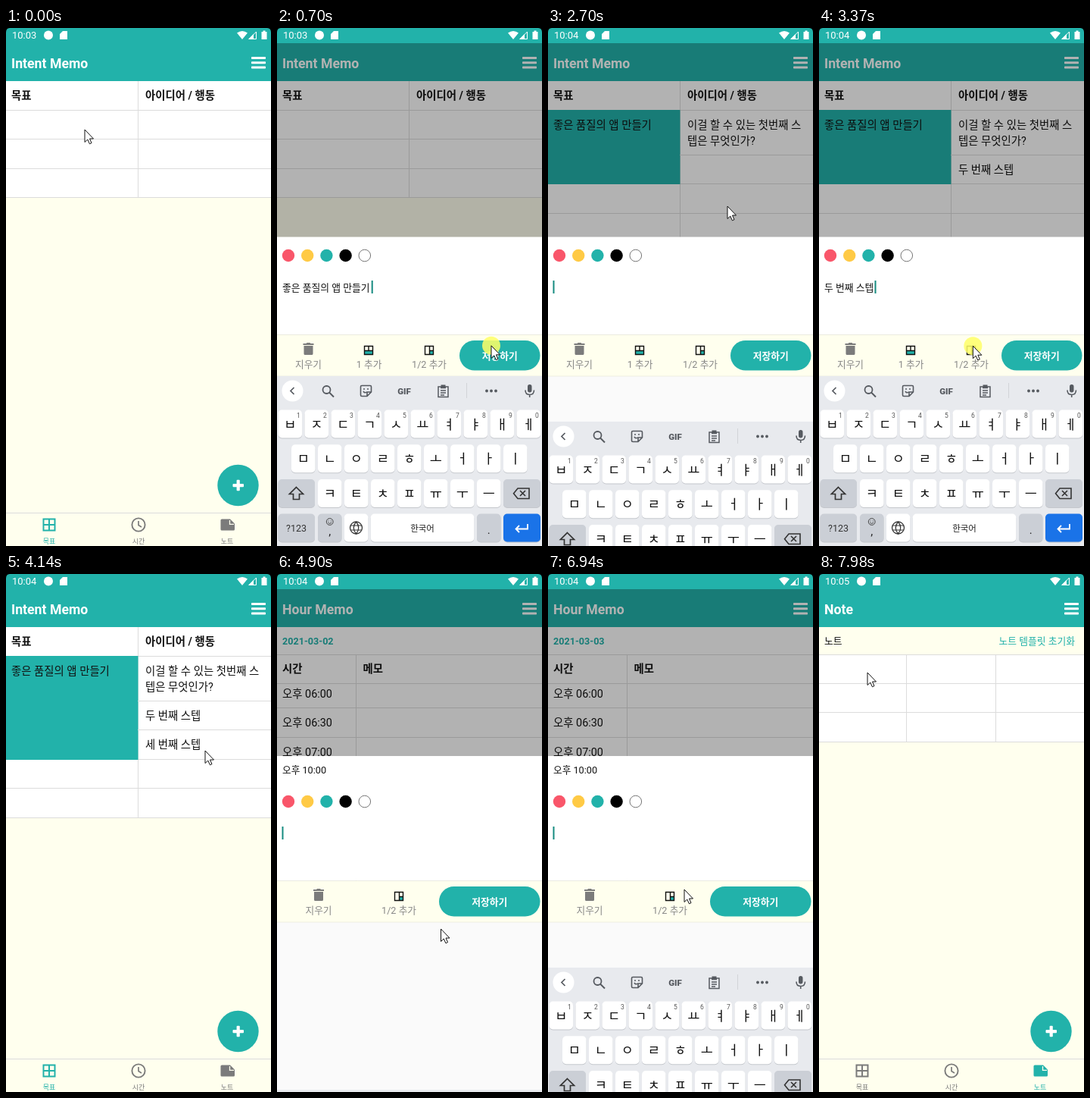
These frames come from a looping animation (350x683 px, 8000 ms). An HTML page:

```html
<!DOCTYPE html>
<html lang="ko">
<head>
<meta charset="utf-8">
<title>Planner demo</title>
<style>
html, body { margin: 0; width: 100%; height: 100%; overflow: hidden; background: #ffffee; }
svg { display: block; width: 100vw; height: 100vh; }
text { font-family: Roboto, "Noto Sans CJK KR", "Noto Sans CJK", "Noto Sans", sans-serif; white-space: pre; }
</style>
</head>
<body>
<svg viewBox="0 0 350 683" preserveAspectRatio="none">
  <g id="view"></g>
  <g id="keyboard"></g>
  <path d="M0 0H5Q0 0 0 6ZM350 0H345Q350 0 350 6Z"/>
  <circle id="glow" r="12" fill="#ffff66" opacity=".85"/>
  <path id="cursor" d="M0 0V16.5L3.8 13L6.4 18.8L9 17.6L6.5 12H11.5Z" fill="#fff" stroke="#111" stroke-width="1"/>
</svg>
<script>
const LOOP = 8000, TEAL = '#22b2aa', CREAM = '#ffffee', GRAY = '#7b7b7b', LINE = '#dcdcdc';
const ROW = 38.4;
const GOAL = '좋은 품질의 앱 만들기';
const FIRST = '이걸 할 수 있는 첫번째 스|텝은 무엇인가?';
const SECOND = '두 번째 스텝', THIRD = '세 번째 스텝', MEMO = 'Gif 만들기';
const FULL = [0, 1];
const $ = id => document.getElementById(id);
const clamp = v => Math.max(0, Math.min(1, v));
const ease = v => v * v * (3 - 2 * v);

// Each entry merges its changes into the state from that time on.
const open = (text = '', type = FULL, fill = '#fff') => ({ edit: true, text, type, draft: fill });
const close = changes => ({ edit: false, ...changes });
const events = [
  [0, { screen: 'goal', goal: '', fill: '', steps: [''], date: '2021-03-02', memo: '', edit: false }],
  [330, open(GOAL, [450, 700])],
  [780, close({ goal: GOAL })],
  [880, open(FIRST, [960, 1160])],
  [1240, close({ steps: [FIRST] })],
  [1320, open(GOAL)],
  [1480, { draft: '#000' }],
  [1690, { draft: TEAL }],
  [1770, close({ fill: TEAL })],
  [1900, open(FIRST)],
  [2180, close({ steps: [FIRST, ''] })],
  [2620, open(SECOND, [2780, 2960])],
  [3060, close({ steps: [FIRST, SECOND] })],
  [3200, open(SECOND)],
  [3400, close({ steps: [FIRST, SECOND, ''] })],
  [3540, open(THIRD, [3700, 3880])],
  [3960, close({ steps: [FIRST, SECOND, THIRD] })],
  [4400, { screen: 'time' }],
  [4600, {}],
  [4900, open(MEMO, [5060, 5280])],
  [5400, close({ memo: MEMO })],
  [5760, open(MEMO)],
  [6060, close()],
  [6420, { date: '2021-03-03', memo: '' }],
  [6860, open()],
  [7220, close()],
  [7500, { screen: 'note' }]
];
const path = [
  [0, 104, 134], [330, 104, 134], [750, 290, 430], [790, 290, 430], [860, 240, 130], [960, 240, 130],
  [1210, 290, 432], [1310, 80, 135], [1450, 91, 300], [1560, 117, 299], [1620, 117, 299],
  [1670, 66, 300], [1750, 290, 432], [1880, 240, 140], [1960, 240, 140], [2130, 200, 430], [2220, 200, 430],
  [2530, 237, 192], [2620, 237, 192], [2690, 237, 235], [2780, 237, 235], [3030, 290, 432], [3180, 237, 190],
  [3350, 200, 430], [3500, 263, 228], [3700, 263, 233], [3930, 290, 432], [4080, 263, 233], [4180, 263, 233],
  [4370, 174, 655], [4540, 65, 619], [4620, 65, 619], [4870, 216.5, 468], [5060, 216.5, 468], [5360, 281, 432],
  [5600, 216.5, 468], [5780, 216.5, 468], [6000, 281, 432], [6090, 281, 432], [6360, 284, 619], [6440, 284, 619],
  [6780, 180, 464], [6860, 180, 460], [6930, 180, 416], [7020, 180, 416], [7180, 281, 432],
  [7450, 292, 655], [7560, 292, 655], [7950, 64, 130], [LOOP, 64, 130]
];

const rect = (x, y, w, h, fill, more = '') => `<rect x="${x}" y="${y}" width="${w}" height="${h}" fill="${fill}" ${more}/>`;
const dot = (x, y, r, fill, more = '') => `<circle cx="${x}" cy="${y}" r="${r}" fill="${fill}" ${more}/>`;
const shape = (d, fill, more = '') => `<path d="${d}" fill="${fill}" ${more}/>`;
const stroke = (d, color, width = 2) => shape(d, 'none', `stroke="${color}" stroke-width="${width}"`);
const hline = (y, x = 0, w = 350) => rect(x, Math.round(y - .5), w, 1, LINE);
const vline = (x, y, h) => rect(x - .5, y, 1, h, LINE);
const label = (s, x, y, size = 14.4, fill = '#111', weight = 400, anchor = 'start') =>
  `<text x="${x}" y="${y}" font-size="${size}" fill="${fill}" font-weight="${weight}" text-anchor="${anchor}">${s}</text>`;
const center = (s, x, y, size, fill, weight = 400) => label(s, x, y, size, fill, weight, 'middle');
const heading = (s, x, y) => label(s, x, y, 14.4, '#111', 700);
const lines = (s, x, y) => s.split('|').map((part, i) => label(part, x, y + 21 * i)).join('');

function topBar(title, t) {
  const clock = t < 1680 ? '10:03' : t < 7720 ? '10:04' : '10:05';
  return rect(0, 0, 350, 70, TEAL) + label(clock, 8, 14.3, 13, '#fff')
    + dot(56, 9.5, 6, '#fff') + shape('M75 4H81V15H71V8Z', '#fff')
    + shape('M305 6.5Q312 1.5 319 6.5L312 15Z', '#fff') + stroke('M321 14.5L330.5 5V14.5Z', '#fff', 1)
    + shape('M320 15L327 8V15Z', '#fff') + shape('M337.5 5H339.5V3.5H342.5V5H344.5V15H337.5Z', '#fff')
    + label(title, 7, 52.5, 17.7, '#fff', 700)
    + [38, 44.3, 50.6].map(y => rect(324, y, 19, 3, '#fff', 'rx=".8"')).join('');
}

function navBar(screen) {
  const tint = name => name === screen ? TEAL : GRAY;
  return rect(0, 639, 350, 44, CREAM) + hline(639)
    + stroke('M49.5 647.5H64.5V662.5H49.5ZM57 647V663M49 655H65', tint('goal'))
    + stroke('M175 650V655.5L179 658', tint('time'), 1.7)
    + dot(175, 655, 8.6, 'none', `stroke="${tint('time')}" stroke-width="1.9"`)
    + shape('M285 647.5H296L302 653.5V661Q302 662.5 300.5 662.5H285Q283.5 662.5 283.5 661V649Q283.5 647.5 285 647.5Z', tint('note'))
    + stroke('M295.5 649V654.3H301', CREAM, 1.3)
    + [['목표', 57, 'goal'], ['시간', 175, 'time'], ['노트', 292, 'note']]
      .map(([s, x, name]) => center(s, x, 680, 9, tint(name))).join('');
}

const addButton = () => dot(306.5, 603, 27.2, TEAL)
  + rect(299.5, 601, 14.5, 4.2, '#fff', 'rx="1"') + rect(304.6, 595.8, 4.2, 14.5, '#fff', 'rx="1"');

function goalScreen(s) {
  let y = 108.3;
  let cells = '';
  s.steps.forEach((step, i) => {
    if (i) cells += hline(y, 174, 176);
    cells += lines(step, 184, y + 24.2);
    y += step.includes('|') ? 59.2 : ROW;
  });
  const bottom = y + 2 * ROW;
  return rect(0, 70, 350, bottom - 70, '#fff')
    + heading('목표', 7, 94) + heading('아이디어 / 행동', 184, 94)
    + [108.3, y, y + ROW, bottom].map(v => hline(v)).join('') + vline(174.5, 70, bottom - 70)
    + (s.fill ? rect(0, 108, 174.5, Math.round(y + .5) - 108, s.fill) : '')
    + label(s.goal, 7, 132.5) + cells + addButton();
}

function timeScreen(s, t) {
  const scroll = 1387.8 * ease(clamp((t - 4600) / 220));
  let rows = '', current = '';
  for (let i = 0; i < 48; i++) {
    const y = 144 + ROW * i - scroll;
    if (y < 100 || y > 599) continue;
    const hour = i >> 1, now = i === 44;
    const time = `${hour < 12 ? '오전' : '오후'} ${String(hour > 12 ? hour - 12 : hour).padStart(2, '0')}:${i % 2 ? '30' : '00'}`;
    rows += hline(y + ROW) + label(time, now ? 8 : 7, y + 24.2);
    if (now) {
      rows += label(s.memo, 114.5, y + 24);
      current = rect(.5, Math.round(y) - .5, 104, 38, 'none', `stroke="${TEAL}" stroke-width="1.2"`);
    }
  }
  return rect(0, 70, 350, 530, '#fff') + vline(104.5, 106, 493) + rows + current
    + rect(0, 70, 350, 74, '#fff') + vline(104.5, 106, 38) + hline(106.3) + hline(144)
    + label(s.date, 7, 93, 12.6, TEAL, 700)
    + heading('시간', 7, 130) + heading('메모', 113.5, 130)
    + rect(0, 599, 350, 40, CREAM)
    + label('현재 시간대로 이동', 15, 624, 12.8, TEAL) + center('달력', 284, 624, 12.8, TEAL)
    + dot(175, 603, 27.2, TEAL) + center('지금', 175, 608, 12.8, '#fff', 700);
}

function noteScreen() {
  return label('노트', 7, 93, 12.8) + label('노트 템플릿 초기화', 338, 93, 12.8, TEAL, 400, 'end')
    + rect(0, 106.3, 350, 115, '#fff') + [0, 1, 2, 3].map(i => hline(106.3 + 38.3 * i)).join('')
    + vline(115.5, 106, 115) + vline(233.5, 106, 115) + addButton();
}

const trash = x => shape(`M${x - 6} 419H${x + 6}V429.5Q${x + 6} 431 ${x + 4.5} 431H${x - 4.5}Q${x - 6} 431 ${x - 6} 429.5ZM${x - 7} 416H${x - 3}L${x - 2} 415H${x + 2}L${x + 3} 416H${x + 7}V418H${x - 7}Z`, GRAY);
const halfIcon = x => rect(x, 425, 6, 6, TEAL) + stroke(`M${x - 5.5} 419.5H${x + 5.5}V430.5H${x - 5.5}ZM${x + .5} 419V431M${x} 425.5H${x + 6}`, '#111', 1.4);
const fullIcon = x => rect(x - 6, 425, 12, 6, TEAL) + stroke(`M${x - 5.5} 419.5H${x + 5.5}V430.5H${x - 5.5}ZM${x} 419V425M${x - 6} 425.5H${x + 6}`, '#111', 1.4);

function editor(s, t) {
  const timed = s.screen === 'time';
  const top = timed ? 240 : 275.5;
  const full = s.text.replace('|', '');
  const typed = full.slice(0, Math.ceil(full.length * clamp((t - s.type[0]) / (s.type[1] - s.type[0]))));
  const caret = 7 + [...typed].reduce((w, c) => w + (c > '\u3130' ? 11.8 : 4), 0);
  const black = s.draft === '#000';
  const [del, half, save] = timed ? [55, 161, 214] : [41.5, 201, 241];
  const swatches = ['#f9566a', '#ffca45', TEAL, '#000'];
  return rect(0, 20, 350, 663, '#000', 'opacity=".3"')
    + rect(0, top, 350, 404 - top, '#fff') + rect(0, 324, 350, 80.5, s.draft)
    + (timed ? label('오후 10:00', 7, 263, 12.7) : '')
    + swatches.map((c, i) => dot(15 + 25.2 * i, 300, 8.2, c)).join('')
    + dot(115.8, 300, 7.8, '#fff', 'stroke="#777" stroke-width="1"')
    + label(typed, 7, 346.5, 12.8, black ? '#0f0' : '#111')
    + (black ? '' : rect(caret - .5, 333, 2, 17, s.draft === TEAL ? '#111' : '#168b80'))
    + rect(0, 404.5, 350, 55, CREAM) + rect(0, 459, 350, 224, '#fafafa') + rect(0, 458.5, 350, 1, '#f0f0e4')
    + trash(del) + center('지우기', del, 448, 12.7, '#888')
    + halfIcon(half) + center('1/2 추가', half, 447.5, 12.7, '#888')
    + (timed ? '' : fullIcon(121) + center('1 추가', 121.5, 447.5, 12.7, '#888'))
    + rect(save, 412, 347.5 - save, 39.5, TEAL, 'rx="19.7"')
    + center('저장하기', (save + 347.5) / 2, 436.5, 12.8, '#fff', 700);
}

function keyboard() {
  const ink = '#565a60', dark = '#cbcfd6';
  const key = (x, y, w, fill = '#fff') => rect(x, y + 1, w, 37, '#c4c7cc', 'rx="5"') + rect(x, y, w, 37, fill, 'rx="5"');
  const letters = (chars, x, y) => [...chars].map((c, i) => key(x + 35 * i, y, 31.5) + center(c, x + 15.7 + 35 * i, y + 25, 17.5, '#111')).join('');
  return rect(0, 459, 350, 224, '#e8eaee')
    + dot(20.5, 478.5, 14, '#fff') + stroke('M22.5 474L18 478.5L22.5 483', ink, 1.7)
    + dot(65.5, 477, 5, 'none', `stroke="${ink}" stroke-width="1.8"`) + stroke('M69 480.5L75 486.5', ink)
    + stroke('M112 471.5H123Q124.5 471.5 124.5 473V480L119 485.5H112Q110.5 485.5 110.5 484V473Q110.5 471.5 112 471.5ZM119 485V480H124M114 479Q116 482 118 480', ink, 1.6)
    + dot(115, 476, 1, ink) + dot(120, 476, 1, ink)
    + center('GIF', 168, 482.5, 11.5, ink, 900)
    + stroke('M213 473H226V486.5H213ZM216 474.5H223M216 478H223M216 481H223M216 484H221', ink, 1.5) + rect(216.5, 470.5, 6, 4, ink)
    + rect(250, 468, 1, 20, '#d2d4d8') + [277, 283, 289].map(x => dot(x, 478.5, 1.9, ink)).join('')
    + rect(331, 470, 5.5, 10.5, ink, 'rx="2.7"') + stroke('M328 477.5Q328 483.5 333.7 483.5T339.5 477.5M333.7 483V487', ink, 1.6)
    + letters('ㅂㅈㄷㄱㅅㅛㅕㅑㅐㅔ', 1.5, 503.5)
    + [...'1234567890'].map((c, i) => center(c, 28.5 + 35 * i, 513.5, 8.5, '#555')).join('')
    + letters('ㅁㄴㅇㄹㅎㅗㅓㅏㅣ', 19, 549.3)
    + key(1.5, 595, 48.5, dark) + letters('ㅋㅌㅊㅍㅠㅜㅡ', 54, 595) + key(299, 595, 49, dark)
    + stroke('M25.5 605.5L34.5 614.5H29.5V621.5H21.5V614.5H16.5Z', '#333', 1.7)
    + stroke('M318 607H333V620.5H318L312.5 613.7ZM321 610L328 617M328 610L321 617', '#333', 1.6)
    + key(1.5, 640.5, 48.5, dark) + center('?123', 25.5, 664, 12.5, '#333')
    + key(54, 640.5, 31.5, dark) + center(',', 69.7, 669, 15, '#222')
    + dot(69.7, 651, 4.4, 'none', 'stroke="#444" stroke-width="1"') + stroke('M67.3 652Q69.7 655 72 652M68 649.5V650.5M71.4 649.5V650.5', '#444', 1)
    + key(88.8, 640.5, 31.5) + dot(104.5, 659, 8, 'none', 'stroke="#333" stroke-width="1.3"')
    + stroke('M97 656H112M97 662H112M104.5 651Q98 659 104.5 667Q111 659 104.5 651', '#333', 1.2)
    + key(123.8, 640.5, 136.5) + center('한국어', 192, 663.5, 11.5, '#222')
    + key(264, 640.5, 31.5, dark) + center('.', 279.7, 667, 15, '#222')
    + key(299, 640.5, 49, '#1a73e8') + stroke('M331 654V660.5H316M320 656L315.5 660.5L320 665', '#fff', 1.8);
}

function stateAt(t) {
  const s = { changed: -LOOP };
  for (const [time, changes] of events) {
    if (time > t) break;
    if ('edit' in changes && time) s.changed = time;
    Object.assign(s, changes);
  }
  return s;
}

function pointerAt(t) {
  const i = path.findIndex((p, n) => n && t <= p[0]);
  const [t0, x0, y0] = path[i - 1], [t1, x1, y1] = path[i];
  const p = ease(clamp((t - t0) / (t1 - t0)));
  return [x0 + (x1 - x0) * p, y0 + (y1 - y0) * p];
}

const screens = {
  goal: ['Intent Memo', goalScreen],
  time: ['Hour Memo', timeScreen],
  note: ['Note', noteScreen]
};
let shown = '';

function render(t) {
  const s = stateAt(t);
  const [title, body] = screens[s.screen];
  const markup = rect(0, 0, 350, 683, CREAM) + body(s, t) + topBar(title, t) + navBar(s.screen) + (s.edit ? editor(s, t) : '');
  if (markup !== shown) $('view').innerHTML = shown = markup;

  const since = t - s.changed;
  const drop = s.edit ? Math.pow(1 - clamp(since / 160), 1.86) : Math.pow(clamp(since / 120), 2);
  $('keyboard').setAttribute('transform', `translate(0 ${Math.round(224 * drop)})`);

  const [x, y] = pointerAt(t);
  $('cursor').setAttribute('transform', `translate(${x} ${y})`);
  $('glow').setAttribute('transform', `translate(${x} ${y})`);
  const pressed = events.some(([time]) => t < time && t > time - 90);
  $('glow').setAttribute('visibility', pressed ? 'visible' : 'hidden');
}

$('keyboard').innerHTML = keyboard();
const start = performance.now();
function frame() {
  render((performance.now() - start) % LOOP);
  requestAnimationFrame(frame);
}
frame();
</script>
</body>
</html>
```
